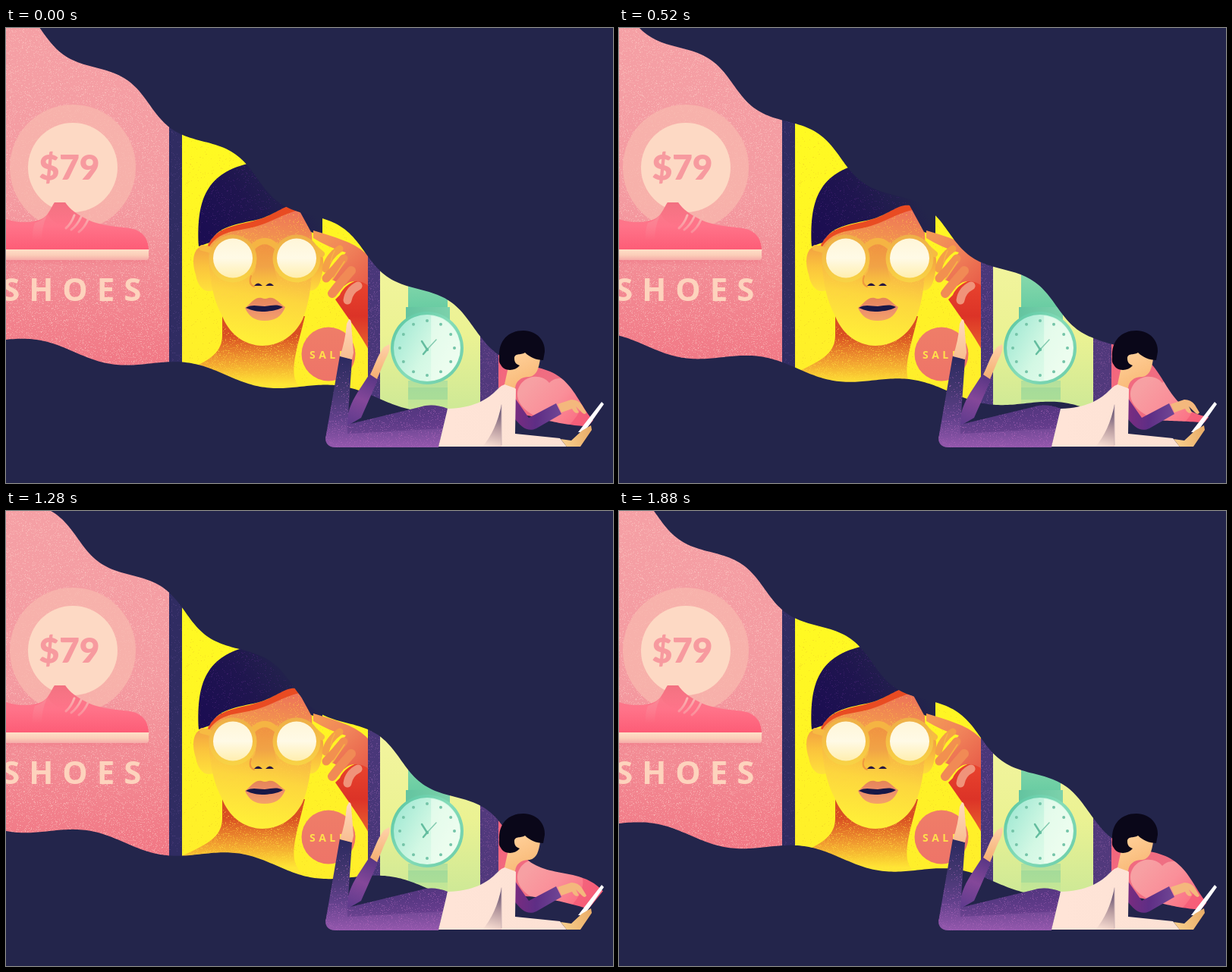
Animation, 800 px wide and 600 px high, one loop 1.92 s. Source, as an HTML page with a canvas:

```html
<!DOCTYPE html>
<html lang="en">
<head>
<meta charset="utf-8">
<title>Shopping stream</title>
<style>
html, body { margin: 0; width: 100%; height: 100%; overflow: hidden; background: #23254b; }
canvas { display: block; width: 800px; height: 600px; }
</style>
</head>
<body>
<canvas id="stage" width="800" height="600"></canvas>
<script>
const W = 800, H = 600, LOOP = 1920, STEP = 40, NAVY = '#23254b';
const ctx = document.getElementById('stage').getContext('2d');

let seed = 7;
function rand() {
  seed = (seed * 1664525 + 1013904223) % 4294967296;
  return seed / 4294967296;
}

function layer(draw) {
  const c = document.createElement('canvas');
  c.width = W;
  c.height = H;
  draw(c.getContext('2d'));
  return c;
}

function fade(x0, y0, x1, y1, ...colors) {
  const f = ctx.createLinearGradient(x0, y0, x1, y1);
  colors.forEach((c, i) => f.addColorStop(i / (colors.length - 1), c));
  return f;
}

function shape(g, d, fill) {
  g.fillStyle = fill;
  g.fill(new Path2D(d));
}

function disc(g, x, y, r, fill) {
  g.fillStyle = fill;
  g.beginPath();
  g.arc(x, y, r, 0, Math.PI * 2);
  g.fill();
}

function box(g, x, y, w, h, fill) {
  g.fillStyle = fill;
  g.fillRect(x, y, w, h);
}

function line(g, d, width, color) {
  g.lineCap = g.lineJoin = 'round';
  g.lineWidth = width;
  g.strokeStyle = color;
  g.stroke(new Path2D(d));
}

// Specks inside a path; weight(v) gives the chance of a speck at height v (0 top, 1 bottom).
function grain(g, d, [x, y, w, h], density, color, weight = () => 1) {
  g.save();
  g.clip(new Path2D(d));
  g.fillStyle = color;
  for (let i = w * h * density; i > 0; i--) {
    const u = rand(), v = rand();
    if (rand() < weight(v)) g.fillRect(x + Math.floor(u * w), y + Math.floor(v * h), 1, 1);
  }
  g.restore();
}

function grainBox(g, r, density, color, weight) {
  const [x, y, w, h] = r;
  grain(g, `M${x},${y}h${w}v${h}h${-w}Z`, r, density, color, weight);
}

function shoePanel(g) {
  box(g, 0, 0, 215, 470, fade(0, 0, 0, 450, '#f5a0a5', '#f49ba1', '#f17885'));
  grainBox(g, [0, 0, 215, 460], .13, 'rgba(255,214,206,.38)');
  disc(g, 88, 184, 83, 'rgba(248,184,174,.75)');
  disc(g, 88, 184, 59, '#fdd9c4');
  g.fillStyle = '#f79a9f';
  g.font = '900 46px Lato, sans-serif';
  g.textAlign = 'center';
  g.fillText('$79', 83.5, 200);
  g.textAlign = 'left';
  shape(g, 'M-5,250C12,258 37,258 50,250C58,244 60,235 64,230H78C84,239 94,246 108,253C125,261 148,262 163,264C181,267 188,279 188,293H-5Z',
    fade(0, 230, 0, 293, '#f67f8b', '#ff7389', '#fd5c76'));
  shape(g, 'M64,230H78C84,239 94,246 101,250L82,262C70,262 60,255 55,245Z', fade(0, 230, 0, 262, 'rgba(240,104,122,.6)', 'rgba(250,102,124,0)'));
  shape(g, 'M38,257Q48,254 54,247Q47,262 47,280H35Q34,268 38,257Z', fade(0, 250, 0, 280, 'rgba(246,158,166,.4)', 'rgba(246,158,166,0)'));
  line(g, 'M90,247Q86,258 79,264M99,249Q94,260 86,266M108,253Q103,264 96,269', 3, fade(0, 246, 0, 270, '#fab4b2', '#fb8b98'));
  box(g, 0, 306, 188, 8, fade(0, 306, 0, 314, 'rgba(235,105,122,.3)', 'rgba(235,105,122,0)'));
  shape(g, 'M0,292H188V303Q188,306 184,306H0Z', fade(0, 292, 0, 307, '#ffe0c8', '#fbcdb8', '#f5a6a6'));
  g.fillStyle = '#fdd3bd';
  g.font = '700 42px "Open Sans", sans-serif';
  g.letterSpacing = '12px';
  g.fillText('SHOES', -5, 360);
  g.letterSpacing = '0px';
}

function glass(g, x) {
  disc(g, x, 304, 31.5, fade(0, 272, 0, 336, '#eeae48', '#f5bf45', '#f8d445'));
  disc(g, x, 303.5, 26, fade(0, 277, 0, 330, '#fff6d8', '#fffae6', '#ffeeae'));
}

function hand(g) {
  shape(g, 'M440,352C446,337 468,328 480,330V428C468,405 447,377 434,358Z', fade(0, 335, 0, 425, '#e8432e', '#dc3327', '#e9632f'));
  const skin = fade(405, 270, 470, 340, '#f49b54', '#f0825a', '#e85f4a');
  shape(g, 'M405,267Q436,276 452,283Q468,290 480,303V341Q460,327 446,340L430,332L440,306L448,296Q426,290 405,277Z', skin);
  line(g, 'M421,318Q424,302 440,291', 9, '#f5a047');
  line(g, 'M422,330Q434,318 445,304', 11, '#f2904f');
  line(g, 'M430,350Q439,338 455,320', 12, '#f18a55');
  line(g, 'M450,359Q452,346 464,340', 11, '#f0937a');
  line(g, 'M433,294Q429,301 428,309M446,308Q437,322 430,332', 1.5, '#f7b545');
}

function facePanel(g) {
  box(g, 232, 100, 245, 400, fade(0, 130, 0, 480, '#fffa22', '#fff424', '#ffee2b'));
  grainBox(g, [232, 100, 245, 390], .025, 'rgba(240,205,40,.5)');

  const neck = 'M285,378V405C285,432 262,440 232,455V500H402L384,470C372,452 386,415 394,380Z';
  shape(g, neck, fade(0, 405, 0, 470, '#d94f22', '#f09a30', '#ffe634'));
  grain(g, neck, [226, 385, 175, 90], .18, 'rgba(255,218,60,.5)', v => .2 + v);

  shape(g, 'M268,287C246,284 244,306 250,325C253,343 263,350 273,346Z', fade(0, 285, 0, 346, '#f29c42', '#fbc43d', '#ffe03b'));
  shape(g, 'M400,290C421,289 420,310 416,327C413,343 406,349 396,345Z', fade(0, 290, 0, 346, '#ef8f49', '#f7b43f', '#ffdc3c'));

  const face = 'M266,284C278,258 330,262 384,234L403,270C405,315 403,356 391,384C380,407 359,419 338,419C312,418 294,403 284,378C270,350 268,326 266,284Z';
  shape(g, face, fade(350, 240, 322, 410, '#ee7558', '#f4a34a', '#fdd63e', '#ffee38'));
  grain(g, face, [266, 235, 138, 120], .06, 'rgba(255,208,70,.5)');
  shape(g, 'M266,287C279,258 308,262 340,250C360,242 371,229 384,234L387,240C363,245 347,259 320,264C298,268 280,270 268,288Z', '#e94b22');

  shape(g, 'M254,288C251,230 262,193 318,179Q360,160 417,160V274L402,269L383,234C368,232 358,244 337,251C310,259 282,258 268,283Z',
    fade(256, 270, 375, 195, '#1b0d52', '#1f154f', NAVY));
  grain(g, 'M254,288C251,230 262,193 318,179L380,232C340,251 285,255 268,283Z', [252, 179, 130, 109], .05, 'rgba(70,35,115,.6)');

  shape(g, 'M327,283H356C351,300 352,318 359,334L350,341H327C320,338 322,329 328,321C331,310 330,296 327,283Z',
    fade(335, 287, 335, 342, 'rgba(239,143,62,.65)', '#f1a346', '#fbcb3d'));
  line(g, 'M326,288Q341,274 356,288', 8, '#f5b443');
  line(g, 'M259,290L274,294M408,291L416,298', 8, '#f7bb42');
  glass(g, 299);
  glass(g, 383);
  line(g, 'M323,327Q319,338 327,341', 2, '#f0993d');
  shape(g, 'M327,340Q332,333 338,340Z', '#281742');
  shape(g, 'M342,340Q348,333 353,340Z', '#281742');

  shape(g, 'M315,369C323,363 328,354 337,356Q341,358 346,356C355,354 360,363 368,368C363,381 354,386 341,386C327,386 320,380 315,369Z',
    fade(0, 354, 0, 386, '#e48454', '#ec8d6c', '#f4a267'));
  shape(g, 'M316,369C325,364 331,367 341,367C351,366 357,364 365,368C356,373 350,373 341,374C331,374 325,373 316,369Z', '#181747');
  hand(g);

  disc(g, 425, 430, 35.5, fade(0, 395, 0, 465, '#ef7d68', '#ee7468'));
  g.fillStyle = '#ffe04b';
  g.font = '700 14px "Open Sans", sans-serif';
  g.letterSpacing = '4.5px';
  g.fillText('SALE', 400, 436);
  g.letterSpacing = '0px';
}

function watchPanel(g) {
  box(g, 493, 270, 132, 250, fade(0, 310, 0, 500, '#f2f49d', '#ebf293', '#cfe996'));
  shape(g, 'M530,290H582V380H530Z', fade(0, 325, 0, 380, '#87d9ab', '#62c9a1'));
  shape(g, 'M527,368H585V392H527Z', fade(527, 0, 585, 0, '#63c4a0', '#7cd1ab'));
  shape(g, 'M530,465H582V520H530Z', fade(0, 465, 0, 505, '#b3e09d', '#c8e894'));
  box(g, 530, 474, 52, 16, 'rgba(142,210,151,.45)');

  const [x, y] = [555, 422];
  disc(g, x, y, 48, fade(510, 385, 600, 460, '#5cc7a4', '#85dcb8', '#6ccdaa'));
  disc(g, x, y, 44, fade(515, 400, 597, 445, '#a6ead5', '#d3f8e4', '#e9fdee'));
  g.save();
  g.translate(x, y);
  g.fillStyle = 'rgba(245,255,242,.55)';
  g.beginPath();
  g.arc(0, 0, 43, -1.45, 1.45);
  g.fill();
  for (let i = 0; i < 12; i++) {
    const a = i * Math.PI / 6;
    disc(g, 36 * Math.sin(a), -36 * Math.cos(a), 2, '#74c4a8');
  }
  g.restore();
  line(g, 'M555,424L567,411', 1.5, '#84cbb0');
  line(g, 'M555,424L548,413M555,424L550,430', 2.5, '#64bd9f');
  disc(g, 555, 424, 2.2, '#64bd9f');
}

function heartPanel(g) {
  g.save();
  g.clip(new Path2D('M648,380H800V485L757,538H648Z'));
  box(g, 648, 380, 152, 160, fade(660, 430, 750, 530, '#f4657c', '#ef6f83', '#f65d78'));
  shape(g, 'M716,468C704,453 676,459 674,482C673,503 702,517 738,528C756,511 767,491 756,476C745,460 724,458 716,468Z',
    fade(690, 470, 750, 525, '#f7a0a3', '#fa8f99', '#fb6e82'));
  g.restore();
}

function panels(g) {
  box(g, 0, 0, W, H, NAVY);
  shoePanel(g);
  facePanel(g);
  watchPanel(g);
  heartPanel(g);
  box(g, 215, 0, 17, 500, '#302c62');
  box(g, 477, 0, 16, 530, '#493779');
  box(g, 625, 0, 24, 540, '#51397c');
  grainBox(g, [215, 100, 17, 350], .05, 'rgba(100,75,145,.4)');
  grainBox(g, [477, 280, 16, 220], .12, 'rgba(150,95,175,.4)');
  grainBox(g, [625, 380, 24, 130], .12, 'rgba(150,95,165,.4)');
}

function legs(g) {
  const far = 'M480,455L490,464L468,514L449,525C449,507 455,494 463,481Z';
  shape(g, far, fade(485, 455, 455, 525, '#533482', '#844799', '#5d3a8c'));
  const near = 'M440,432L456,437L450,523L545,500C557,496 570,497 582,502L570,553H434C424,553 419,546 422,536Z';
  shape(g, near, fade(0, 435, 0, 553, '#2c2a60', '#42366f', '#60408a', '#9458ad'));
  shape(g, 'M450,523L545,500C557,496 570,497 582,502L576,528L450,535Z',
    fade(460, 500, 570, 530, 'rgba(64,42,112,.3)', 'rgba(90,50,132,.5)'));
  grain(g, near, [420, 435, 162, 118], .13, 'rgba(173,103,185,.5)', v => v);
  shape(g, 'M452,384Q455,384 455,390L458,428L456,437L440,433Q447,414 449,390Z', fade(0, 385, 0, 437, '#ffdabb', '#f8bd91'));
  shape(g, 'M505,417C508,424 501,434 497,444L489,463L480,457C486,445 490,431 498,421Z', fade(0, 418, 0, 462, '#ffd2a8', '#f4ae72'));
}

function person(g) {
  legs(g);

  const sleeve = 'M668,484L689,514L725,495L732,509L699,528C688,533 680,528 668,512Z';
  shape(g, sleeve, fade(670, 500, 730, 505, '#7b2c80', '#5e2e85', '#6f4594'));
  shape(g, 'M727,496L745,490Q754,490 759,497L765,507Q763,511 759,507L751,499L755,507Q750,510 746,502L732,507Z', '#f4b87d');

  shape(g, 'M582,502C617,501 633,490 644,480Q656,467 665,469L672,476L671,535L730,541L739,552H570Z', fade(590, 0, 735, 0, '#ffe4d7', '#fce1d4'));
  shape(g, 'M653,497V552H628Q646,531 653,497Z', fade(650, 500, 635, 552, '#59486d', '#b79a9f', '#fbe0d4'));
  line(g, 'M653,497V550', 1, '#cdb3b5');

  shape(g, 'M662,447L657,470L671,475C672,466 678,460 690,460C700,458 702,448 704,437L688,423L668,430Z',
    fade(670, 430, 690, 472, '#ffcf98', '#f8b875'));
  shape(g, 'M650,434C649,412 662,399 682,399C700,399 711,413 710,427L708,438C699,438 690,434 684,428C678,432 670,428 670,436C670,442 674,444 677,445C671,453 656,453 652,444Q649,441 650,434Z', '#0a0719');

  shape(g, 'M785,493L788,496L762,533H754Z', '#ffffff');
  shape(g, 'M731,542L745,544L759,531L771,524L772,530L757,552H739Z', fade(735, 540, 770, 530, '#f8cb89', '#e9ae69'));
}

// A sine wave running leftward along a tilted baseline; tail lowers its right end.
function edge({ slope, base, period, zero, amp, tail }, p) {
  const n = 1 / Math.hypot(1, slope), pts = [];
  for (let x = -60; x <= 840; x += 3) {
    const end = tail * Math.min(1, Math.max(0, (x - 630) / 60));
    const d = (amp + end * .7) * Math.sin(2 * Math.PI * ((x - zero) / period + p));
    pts.push([x - d * slope * n, base + slope * x + end + d * n]);
  }
  return pts;
}

const TOP = { slope: .686, base: -28.8, period: 142, zero: 615, amp: 10, tail: 3 };
const BOTTOM = { slope: .152, base: 413.5, period: 200, zero: 290, amp: 8.5, tail: -7 };

function stream(p) {
  const path = new Path2D();
  [...edge(TOP, p), ...edge(BOTTOM, p).reverse()].forEach(([x, y]) => path.lineTo(x, y));
  path.closePath();
  return path;
}

const scene = layer(panels), reader = layer(person);
const start = performance.now();

function frame() {
  const t = (performance.now() - start) % LOOP;
  const p = Math.floor(t / STEP) * STEP / LOOP;
  box(ctx, 0, 0, W, H, NAVY);
  ctx.save();
  ctx.clip(stream(p));
  ctx.drawImage(scene, 0, 0);
  ctx.restore();
  ctx.drawImage(reader, 0, 0);
  requestAnimationFrame(frame);
}
frame();
</script>
</body>
</html>
```
